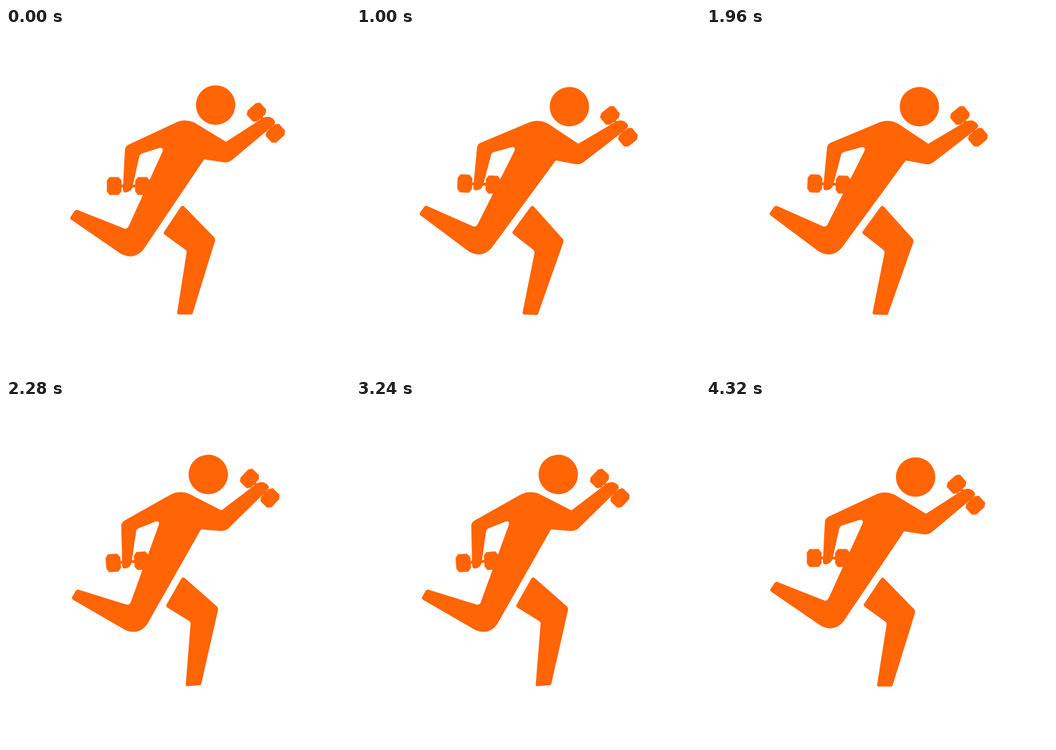
An HTML page for the animation above (4800 ms loop, 480 by 480 pixels).

```html
<!DOCTYPE html>
<html lang="en">
<head>
<meta charset="utf-8">
<title>Runner with dumbbells</title>
<style>
  html, body { margin: 0; width: 100%; height: 100%; overflow: hidden; background: #fff; }
  svg { display: block; width: 100%; height: 100%; }
</style>
</head>
<body>
<svg viewBox="0 0 480 480">
  <defs>
    <path id="weight" d="M-6.5-12.3H6L10-7.5V7.5L6 12.3H-6.5L-10 7.5V-7.5Z" stroke="#ff6405" stroke-width=".6" stroke-linejoin="round"/>
    <g id="dumbbell">
      <use href="#weight" x="-20"/>
      <use href="#weight" x="19.5"/>
      <rect x="-12" y="-2" width="24" height="4"/>
    </g>
  </defs>
  <g id="runner" fill="#ff6405">
    <circle cx="292.5" cy="107.5" r="27.5"/>
    <path d="M100 254L165 279.8Q169 281 171 277L218.500 172Q220 166.500 214.500 167.300L190 175Q186.500 176.300 185.800 180L176.500 222Q174 229 167 229.500Q163 229.500 163 225L166 170Q166.300 165 171 162.700L238 131.500Q250 126.500 263 132L307 158.800L357 126.500Q364 122 370 125Q375.500 128 375.500 132Q374 135 371 137.500L315 184.500Q309.500 188.500 303 187.300L276.500 183.200L191.500 309.500Q179 324 161 315.500L91 267.500Q88.500 265.500 90.500 263L95.500 255.500Q97.500 253 100 254Z"/>
    <path d="M248.500 249L290 291.500Q292.500 294 291.500 297.500L260.500 398Q260 399.800 258 399.800H241Q238.500 399.800 238.800 397L252 313.500Q252.300 311 250.500 309.500L221.500 288.500Q219 286.500 220.800 284L243.500 250Q246 246.500 248.500 249Z"/>
    <use href="#dumbbell" transform="translate(171 220.500)"/>
    <use href="#dumbbell" transform="translate(363 132.500) rotate(48)"/>
  </g>
</svg>
<script>
  const runner = document.getElementById('runner');
  const LOOP = 960, STEP = 40, SWING = 480, MAX = 6.2;
  const keys = [0, MAX, -MAX, MAX, -MAX, 0];

  const ease = u => (1 - Math.cos(Math.PI * u)) / 2;

  function angleAt(ms) {
    const t = Math.floor((ms % LOOP) / STEP + 1e-6) * STEP;
    if (t >= SWING) return 0;
    const pos = t / SWING * (keys.length - 1);
    const i = Math.floor(pos);
    return keys[i] + (keys[i + 1] - keys[i]) * ease(pos - i);
  }

  function draw(ms) {
    runner.setAttribute('transform', `rotate(${angleAt(ms).toFixed(3)} 240 240)`);
  }

  const start = performance.now();
  function tick() {
    draw(performance.now() - start);
    requestAnimationFrame(tick);
  }
  draw(0);
  requestAnimationFrame(tick);
</script>
</body>
</html>
```
